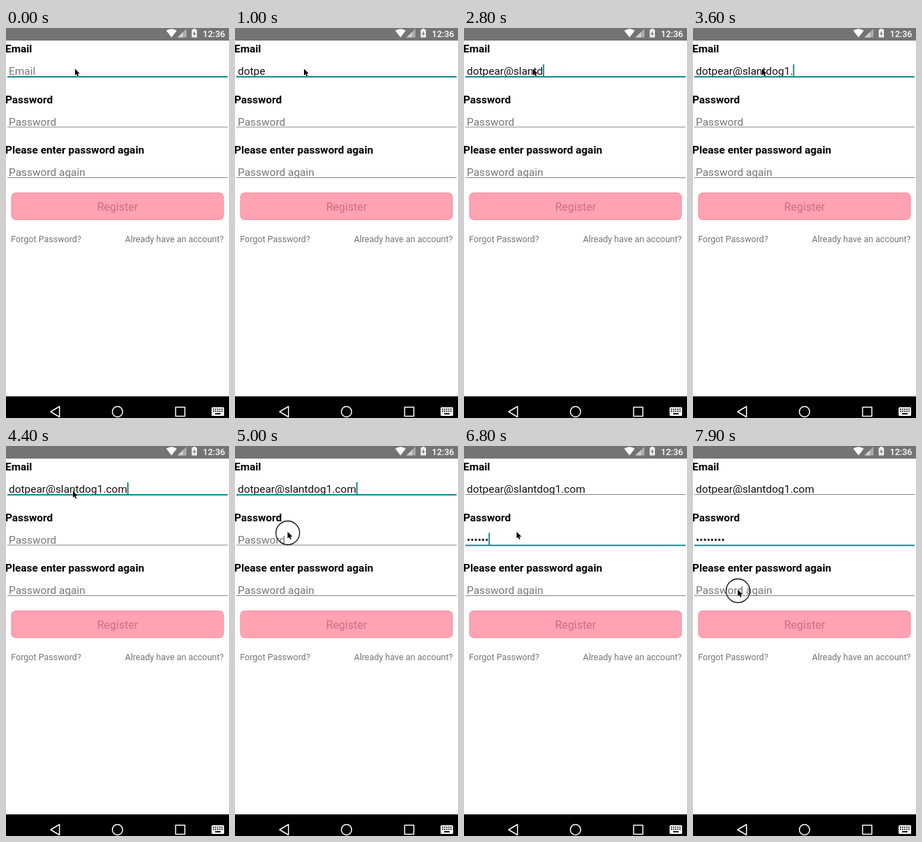
An HTML page with a canvas for the animation above (8 s loop, 320x559 px).

```html
<!DOCTYPE html>
<html lang="en">
<head>
<meta charset="utf-8">
<title>Register form</title>
<style>
  html, body { margin: 0; width: 100%; height: 100%; overflow: hidden; background: #fff; }
  canvas { display: block; width: 320px; height: 559px; }
</style>
</head>
<body>
<canvas id="stage"></canvas>
<script>
const W = 320, H = 559, LOOP = 8000, STEP = 100;
const TEAL = '#0b838b', GRAY = '#757575', BAR = '#757375';
const EMAIL = 'dotpear@slantdog1.com';
const FOCUS_AT = 5100;

// Key press times in ms
const EMAIL_KEYS = [100, 200, 300, 400, 500, 1100, 1200, 1800, 2000, 2100, 2200,
  2400, 2500, 2800, 2900, 3000, 3400, 3600, 3800, 3900, 4000];
const PASS_KEYS = [5800, 5900, 6100, 6300, 6500, 6800, 7000, 7300];

// Pointer path: time, x, y
const PATH = [[4300, 99, 58.5], [4400, 96, 64.5], [4800, 75.5, 123],
  [7400, 75.5, 123], [7800, 64.3, 206]];
const TAPS = [[4900, 5100], [7900, 8000]];

const canvas = document.getElementById('stage');
const ctx = canvas.getContext('2d');
const dpr = window.devicePixelRatio || 1;
canvas.width = W * dpr;
canvas.height = H * dpr;
ctx.scale(dpr, dpr);

function rect(x, y, w, h, color) {
  ctx.fillStyle = color;
  ctx.fillRect(x, y, w, h);
}

function text(str, x, y, size, color, weight = 400, align = 'left') {
  ctx.font = `${weight} ${size}px Roboto, sans-serif`;
  ctx.textAlign = align;
  ctx.fillStyle = color;
  ctx.fillText(str, x, y);
  return ctx.measureText(str).width;
}

function poly(points) {
  ctx.beginPath();
  points.forEach(([x, y]) => ctx.lineTo(x, y));
  ctx.closePath();
}

function fillPoly(points, color) {
  poly(points);
  ctx.fillStyle = color;
  ctx.fill();
}

function statusBar() {
  rect(0, 0, W, 18, BAR);
  ctx.beginPath();
  ctx.moveTo(237.5, 13.5);
  ctx.arc(237.5, 13.5, 12.3, -Math.PI / 2 - 0.66, -Math.PI / 2 + 0.66);
  ctx.closePath();
  ctx.fillStyle = '#fff';
  ctx.fill();
  fillPoly([[246, 13.5], [259, 13.5], [259, 1]], 'rgba(255,255,255,.4)');
  fillPoly([[246, 13.5], [254, 13.5], [254, 5.8]], 'rgba(255,255,255,.45)');
  rect(268.5, 1, 3.5, 2, '#f2f2f2');
  rect(266.5, 2.3, 7.5, 11.2, '#f2f2f2');
  fillPoly([[271, 4], [268, 8.7], [270, 8.7], [269.6, 12], [272.6, 7.4], [270.6, 7.4]], BAR);
  text('12:36', 314.5, 13, 12.6, '#fff', 500, 'right');
}

function navBar() {
  rect(0, 528, W, 31, '#000');
  ctx.strokeStyle = '#fff';
  ctx.lineWidth = 1.5;
  ctx.lineJoin = 'round';
  poly([[64, 550], [76.7, 542.5], [76.7, 557.5]]);
  ctx.stroke();
  ctx.beginPath();
  ctx.arc(160, 550, 7.4, 0, Math.PI * 2);
  ctx.stroke();
  ctx.strokeRect(243.4, 543.4, 13.2, 13.2);
  ctx.beginPath();
  ctx.roundRect(295, 543.5, 18, 12.5, 1.5);
  ctx.fillStyle = '#fff';
  ctx.fill();
  for (let i = 0; i < 10; i++) {
    rect(297 + (i % 5) * 3, 545.6 + Math.floor(i / 5) * 3, 1.7, 1.7, '#000');
  }
  rect(300, 552, 8, 1.8, '#000');
}

function field(top, label, hint, value, focused, caret) {
  text(label, -1, top + 17, 15.4, '#000', 700);
  const width = text(value || hint, 4, top + 49, 15.45, value ? '#111' : GRAY);
  if (focused) rect(2, top + 51, 316, 1.9, TEAL);
  else rect(2, top + 51, 316, 1, '#858585');
  if (caret) rect(4 + (value ? width : 0), top + 34, 1.8, 17.5, TEAL);
}

function button() {
  ctx.beginPath();
  ctx.roundRect(8, 236.4, 304, 38.2, 6);
  ctx.fillStyle = '#ffa3b3';
  ctx.fill();
  ctx.strokeStyle = '#fb8ea1';
  ctx.lineWidth = 1.2;
  ctx.stroke();
  text('Register', 160, 262.3, 16, '#cd6f7f', 400, 'center');
}

function pointerAt(t) {
  if (t <= PATH[0][0]) return PATH[0].slice(1);
  const i = PATH.findIndex(p => p[0] > t);
  if (i < 0) return PATH[PATH.length - 1].slice(1);
  const [t0, x0, y0] = PATH[i - 1], [t1, x1, y1] = PATH[i];
  const k = (t - t0) / (t1 - t0);
  return [x0 + (x1 - x0) * k, y0 + (y1 - y0) * k];
}

function pointer(t) {
  const [x, y] = pointerAt(t);
  if (TAPS.some(([from, to]) => t >= from && t < to)) {
    ctx.beginPath();
    ctx.arc(x + 0.2, y + 1.5, 17, 0, Math.PI * 2);
    ctx.strokeStyle = '#111';
    ctx.lineWidth = 1.3;
    ctx.stroke();
  }
  const arrow = [[0, 0], [0, 9.5], [2.2, 7.5], [3.7, 11], [5.3, 10.3], [3.8, 7], [6.8, 6.8]];
  poly(arrow.map(([dx, dy]) => [x + dx, y + dy]));
  ctx.strokeStyle = 'rgba(255,255,255,.7)';
  ctx.lineWidth = 1;
  ctx.stroke();
  ctx.fillStyle = '#000';
  ctx.fill();
}

function draw(now) {
  const t = Math.floor((now % LOOP) / STEP) * STEP;
  const onPass = t >= FOCUS_AT;
  const typed = keys => keys.filter(k => k <= t).length;
  const lastKey = Math.max(-500, ...[...EMAIL_KEYS, FOCUS_AT, ...PASS_KEYS].filter(k => k <= t));
  const blink = (t - lastKey) % 1000 < 500 && lastKey >= 0;

  rect(0, 0, W, H, '#fff');
  field(18, 'Email', 'Email', EMAIL.slice(0, typed(EMAIL_KEYS)), !onPass, !onPass && blink);
  field(90.5, 'Password', 'Password', '•'.repeat(typed(PASS_KEYS)), onPass, onPass && blink);
  field(163, 'Please enter password again', 'Password again', '', false, false);
  button();
  text('Forgot Password?', 7.3, 306.7, 12.5, GRAY);
  text('Already have an account?', 312.5, 306.7, 12.5, GRAY, 400, 'right');
  statusBar();
  navBar();
  pointer(t);
}

const start = performance.now();
function tick() {
  draw(performance.now() - start);
  requestAnimationFrame(tick);
}
tick();
</script>
</body>
</html>
```
